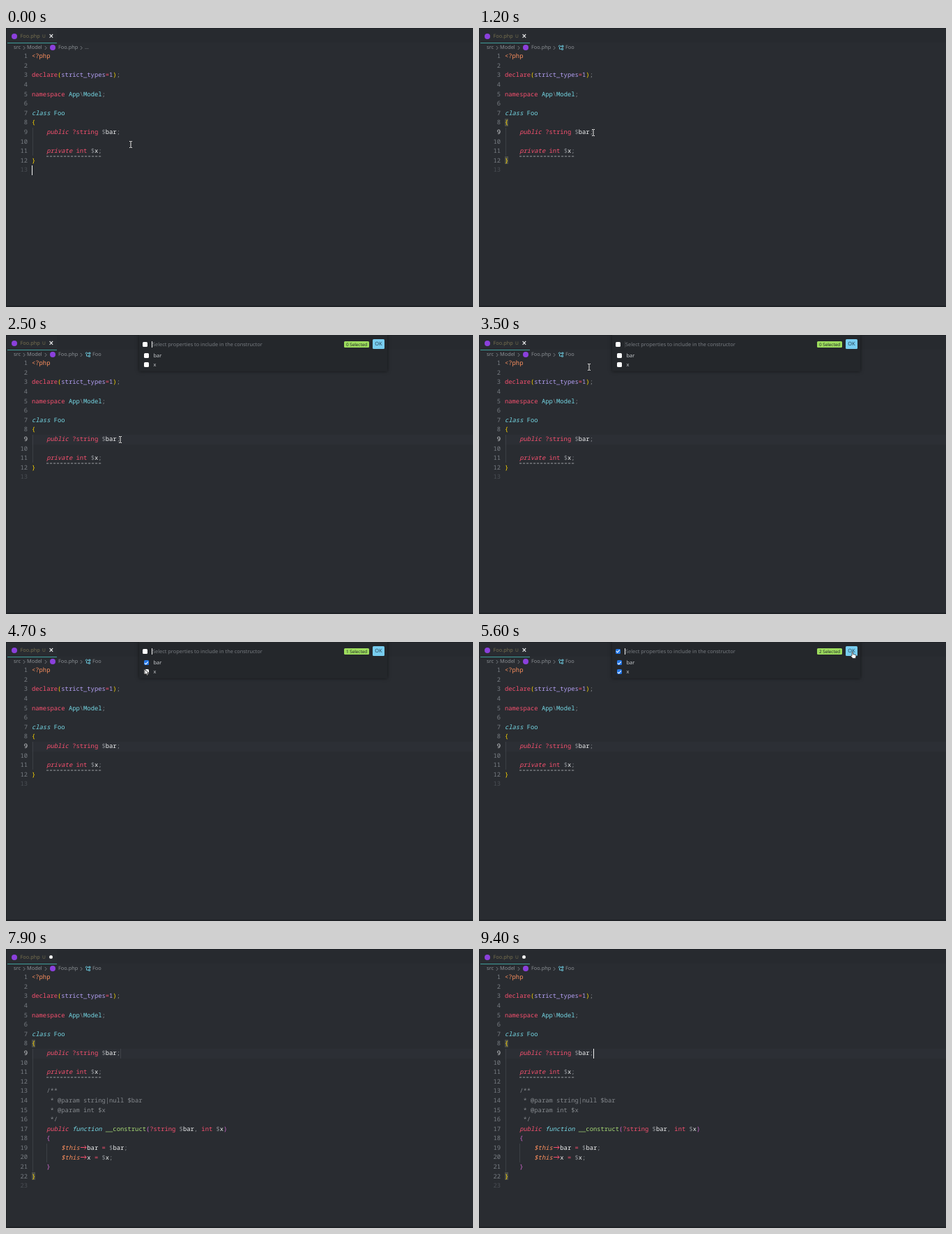
An HTML page for the animation above (9600 ms loop, 670x400 px).

```html
<!DOCTYPE html>
<html lang="en">
<head>
<meta charset="utf-8">
<title>Generate constructor</title>
<style>
html, body { margin: 0; width: 100%; height: 100%; overflow: hidden; background: #292c31; }
#stage {
  position: relative; width: 670px; height: 400px; overflow: hidden; background: #292c31;
  font: 7.36px/14px "Noto Sans", "Open Sans", sans-serif; color: #c8cbcf;
  text-rendering: geometricPrecision; white-space: pre;
}
#stage div, #stage pre, #stage svg.abs { position: absolute; }
pre { margin: 0; font: 500 8.82px/13.6px "Noto Sans Mono", "DejaVu Sans Mono", monospace; color: #f1f2f3; }
.hide { visibility: hidden; }

.edge { background: #1f2226; }
.tabline { left: 2px; top: 21px; width: 71px; height: 1px; background: #3f9d99; }
.dot { border-radius: 50%; }
.file { width: 8px; height: 8px; background: #8b40dc; }
.crumb { color: #8a8e93; }
.tab { color: #756e4e; }

/* syntax colours */
i { font-style: normal; }
.t { font-style: italic; }
.r { color: #f8506f; }
.o { color: #fb8f5e; }
.c { color: #76d9e6; }
.p { color: #b5a1f5; }
.g { color: #a9dc76; }
.d { color: #85898e; }
.y { color: #ffd700; }
.m { color: #d56ad2; }
.raw i:not(.y):not(.m) { color: #e6e7e9; font-style: normal; }
.arrow { width: 10.58px; height: 7px; vertical-align: -0.5px; fill: none; stroke: currentColor; stroke-width: 1; }

#nums { left: 0; top: 34.2px; width: 31px; text-align: right; color: #777c82; }
#nums .dim { color: #4a4e54; }
#nums .now { color: #d4d6d9; }
.guide { width: 1px; background: #3b3f45; }
.match { left: 37px; width: 5px; height: 11px; background: #4a4d48; }
#band { left: 37px; top: 143px; width: 633px; height: 14px; background: #2c2f35; }
#caret { width: 1px; height: 14px; background: #f2f2f2; }

.panel { left: 191px; top: 0; width: 356px; background: #24272b; box-shadow: 0 0 5px #0008; overflow: hidden; }
.field { left: 5px; top: 8px; width: 346px; height: 10px; border: 1px solid #34373c; background: #222529; }
.blink { top: 9px; width: 1px; height: 9px; background: #f2f2f2; }
.key { height: 10px; line-height: 10px; font-size: 6.3px; padding: 0 2.5px; border-radius: 2px; background: #35383d; }
.keys { display: flex; align-items: center; }
#stage .keys > * { position: static; }
.plus { width: 9px; text-align: center; }
.chord { width: 7px; }
.box { width: 7px; height: 7px; border-radius: 1.5px; background: #fff; }
.box.on { background: #2477e6; }
.box.on::after {
  content: ""; position: absolute; left: 2.2px; top: .6px; width: 1.6px; height: 3.6px;
  border: solid #fff; border-width: 0 1px 1px 0; transform: rotate(42deg);
}
.badge { left: 294px; top: 9px; width: 36px; height: 9px; line-height: 9px; font-size: 6.3px; text-align: center; border-radius: 1.5px; background: #9ddc5d; color: #22282a; }
.ok { left: 335px; top: 6px; width: 17px; height: 14px; text-align: center; border-radius: 1.5px; background: #78cdf0; color: #28485a; }
#mouse { left: 0; top: 0; width: 14px; height: 14px; overflow: visible; }
</style>
</head>
<body>
<div id="stage">
  <div class="edge" style="left:0;top:0;width:1px;height:400px"></div>
  <div class="edge" style="left:0;top:0;width:670px;height:1px"></div>
  <div class="edge" style="left:0;top:398px;width:670px;height:2px"></div>
  <div style="left:73px;top:1px;width:597px;height:20px;background:#272a2f"></div>
  <div class="tabline"></div>
  <div class="dot file" style="left:8px;top:8px"></div>
  <div class="tab" style="left:20.5px;top:5px">Foo.php</div>
  <div class="tab" style="left:52px;top:5px;font-size:6.6px">U</div>
  <svg class="abs" id="close" style="left:62px;top:8px" width="6" height="7" stroke="#e8e9ea" stroke-width="1.1"><path d="M.6 1 5.2 5.8M5.2 1 .6 5.8"/></svg>
  <div class="dot" id="dirty" style="left:62px;top:9px;width:5px;height:5px;background:#f0f0f0"></div>

  <div class="crumb" style="left:11px;top:21px">src</div>
  <div class="crumb" style="left:30px;top:21px">Model</div>
  <div class="dot file" style="left:63px;top:24px"></div>
  <div class="crumb" style="left:75px;top:21px">Foo.php</div>
  <svg class="abs" style="left:0;top:21px" width="112" height="14" fill="none" stroke="#8a8e93" stroke-width=".8"><path d="m24.8 5 2.4 2.5-2.4 2.5M55.8 5l2.4 2.5-2.4 2.5M106.8 5l2.4 2.5-2.4 2.5"/></svg>
  <div class="crumb" id="more" style="left:113px;top:21px">…</div>
  <div class="crumb" id="symbol" style="left:124px;top:21px">Foo<svg class="abs" style="left:-11px;top:3px" width="9" height="8" fill="none" stroke="#68bfd2" stroke-width="1"><path d="M1 2.2 2.5.8 4 2.2 2.5 3.7zM2.5 3.7v2.5h3M4 2.2h2M6 1.2h2v2H6zM5.6 5.2h2v2h-2z"/></svg></div>

  <div id="band"></div>
  <div class="guide" id="outer" style="left:38px;top:143px"></div>
  <div class="guide" id="inner" style="left:58px;top:279px;height:27px"></div>
  <div class="match" style="top:130px"></div>
  <div class="match" id="endMatch"></div>
  <pre id="nums"></pre>
  <pre style="left:37px;top:34.2px"><i class="o">&lt;?php</i>

<i class="r">declare</i><i class="y">(</i><i class="p">strict_types</i><i class="r">=</i><i class="p">1</i><i class="y">)</i><i class="d">;</i>

<i class="r">namespace</i> <i class="c">App</i><i class="d">\</i><i class="c">Model</i><i class="d">;</i>

<i class="c t">class</i> <i class="c">Foo</i>
<i class="y">{</i>
    <i class="r t">public</i> <i class="r">?string</i> <i class="d">$</i>bar<i class="d">;</i>

    <i class="r t">private</i> <i class="r">int</i> <i class="d">$</i>x<i class="d">;</i></pre>
  <svg class="abs" style="left:58px;top:183px" width="80" height="2" stroke="#9a9da1" stroke-dasharray="3.2 1.8"><path d="M0 1h79"/></svg>
  <pre id="shortEnd" style="left:37px;top:183.8px"><i class="y">}</i></pre>
  <pre id="added" style="left:37px;top:197.4px">    <i class="d">/**</i>
    <i class="d"> * @param string|null $bar</i>
    <i class="d"> * @param int $x</i>
    <i class="d"> */</i>
    <i class="r t">public</i> <i class="c t">function</i> <i class="g">__construct</i><i class="m">(</i><i class="r">?string</i> <i class="d">$</i>bar<i class="d">,</i> <i class="r">int</i> <i class="d">$</i>x<i class="m">)</i>
    <i class="m">{</i>
        <i class="o t">$this</i><i class="r to"></i>bar <i class="r">=</i> <i class="d">$</i>bar<i class="d">;</i>
        <i class="o t">$this</i><i class="r to"></i>x <i class="r">=</i> <i class="d">$</i>x<i class="d">;</i>
    <i class="m">}</i>
<i class="y">}</i></pre>
  <div id="caret"></div>

  <div class="panel" id="palette" style="height:290px">
    <div class="field"></div>
    <div style="left:8px;top:6.5px">&gt;</div>
    <div class="blink" style="left:13px"></div>
    <div style="left:4px;top:23px;width:350px;height:13px;background:#383b40"></div>
    <div style="left:4px;top:140px;width:350px;height:1px;background:#33363b"></div>
    <div style="right:26px;top:22.5px">recently used</div>
    <svg class="abs" style="left:334px;top:25px" width="9" height="9" fill="none" stroke="#c8cbcf"><circle cx="4.5" cy="4.5" r="2.6"/><circle cx="4.5" cy="4.5" r="3.5" stroke-dasharray="1.3 1.45"/><circle cx="4.5" cy="4.5" r=".5"/></svg>
    <div style="right:12px;top:140px;color:#3b94ec">other commands</div>
    <div id="thumb" style="left:350px;top:23px;width:5px;height:13px;background:#53575c"></div>
  </div>

  <div class="panel" id="picker" style="height:52px">
    <div class="box" id="all" style="left:4.5px;top:9.5px"></div>
    <div style="left:19px;top:6.5px;color:#777b80">Select properties to include in the constructor</div>
    <div class="blink" style="left:18px"></div>
    <div class="badge"><span id="count">0</span> Selected</div>
    <div class="ok">OK</div>
    <div class="box" id="bar" style="left:7px;top:26px"></div>
    <div style="left:20.5px;top:22.5px">bar</div>
    <div class="box" id="x" style="left:7px;top:39px"></div>
    <div style="left:20.5px;top:35.5px">x</div>
  </div>

  <svg class="abs" id="mouse" stroke-linejoin="round">
    <g id="beam" fill="none"><path d="M-2-4.5h1.3L0-3.8.7-4.5H2M0-3.8V3.8M-2 4.5h1.3L0 3.8.7 4.5H2" stroke="#15171a" stroke-width="2"/><path d="M-2-4.5h1.3L0-3.8.7-4.5H2M0-3.8V3.8M-2 4.5h1.3L0 3.8.7 4.5H2" stroke="#fff" stroke-width="1"/></g>
    <path id="arrow" d="M0 0V8.2L2 6.4 3.4 9.3 4.8 8.6 3.4 5.8H6z" fill="#fff" stroke="#111" stroke-width=".9"/>
    <path id="hand" d="M0 .6Q.8-.4 1.6.6V3.6L5 4.2Q6.2 4.5 6 6L5.4 9.4H1.2L-1.6 6.4Q-1.4 5.2 0 5.8z" fill="#fff" stroke="#15171a" stroke-width=".7"/>
  </svg>
</div>

<script>
const $ = id => document.getElementById(id);
const all = sel => [...document.querySelectorAll(sel)];
const show = (el, on) => el.classList.toggle("hide", !on);
const LOOP = 9600, ROW = 13.6;

$("nums").innerHTML = Array.from({ length: 23 }, (_, i) => `<i>${i + 1}</i>`).join("\n");
const nums = [...$("nums").children];
all(".to").forEach(el => el.innerHTML =
  '<svg class="arrow" viewBox="0 0 10.58 7"><path d="M1 3.5H9.2M6.6 1 9.2 3.5 6.6 6"/></svg>');

// Palette rows: label | shortcut | right edge of the shortcut
const tool = "Mellowed Dev Crate. ";
const commands = [
  ...["Generate class constructor", "Generate class", "Generate trait", "Insert getter and setter",
    "Insert getter", "Insert setter", "Generate abstract class", "Generate enum"].map(s => tool + s),
  "Accounts: Manage Trusted Extensions For Account",
  "Add Cursor Above|Shift+Alt+UpArrow|76", "Add Cursor Below|Shift+Alt+DownArrow",
  "Add Cursors To Bottom", "Add Cursors to Line Ends|Shift+Alt+I", "Add Cursors To Top",
  "Add Data Breakpoint at Address", "Add Function Breakpoint", "Add Line Comment|Ctrl+K Ctrl+C",
  "Add Selection To Next Find Match", "Add Selection To Previous Find Match",
  "Add to Favorites", "Add XHR/fetch Breakpoint"
];
const chips = s => s.split(" ").map(part => part.split("+")
  .map(k => `<div class="key">${k}</div>`).join('<div class="plus">+</div>'))
  .join('<div class="chord"></div>');
commands.forEach((row, i) => {
  const [label, keys, right = 15] = row.split("|"), top = 22.5 + 13 * i;
  $("palette").insertAdjacentHTML("beforeend", `<div style="left:10px;top:${top}px">${label}</div>` +
    (keys ? `<div class="keys" style="right:${right}px;top:${top}px">${chips(keys)}</div>` : ""));
});

// Pointer path: time, x, y
const path = [
  [0, 179, 167], [100, 175, 163], [200, 168, 155], [300, 164, 150], [3400, 164, 150],
  [3500, 158, 46], [3600, 172, 37], [3800, 198, 28], [4400, 199, 29], [4700, 199, 39],
  [5000, 200, 39], [5200, 262, 35], [5400, 505, 20], [5600, 535, 14], [6700, 535, 14],
  [6900, 645, 14]
];
function pointer(t) {
  const i = path.findIndex(p => p[0] > t);
  if (i < 0) return path[path.length - 1].slice(1);
  const [a, b] = [path[i - 1], path[i]], k = (t - a[0]) / (b[0] - a[0]);
  return [a[1] + (b[1] - a[1]) * k, a[2] + (b[2] - a[2]) * k];
}

// Half a second on, half a second off, with a soft first step
function blink(t, since) {
  const age = t - since, phase = age % 1000;
  if (age < 500) return 1;
  if (phase >= 500) return phase < 600 ? .5 : .1;
  return phase < 100 ? .1 : 1;
}

function render(time) {
  const t = Math.floor(time / 100) * 100;
  const clicked = t >= 400, named = t >= 500, inserted = t >= 6000;
  const palette = t >= 1400 && t < 2500, picker = t >= 2500 && t < 5900;
  const last = inserted ? 23 : 13;

  show($("close"), !inserted);
  show($("dirty"), inserted);
  show($("more"), !named);
  show($("symbol"), named);
  show($("band"), t >= 1400);
  show($("shortEnd"), !inserted);
  show($("added"), inserted);
  show($("inner"), inserted);
  $("added").classList.toggle("raw", t < 6200);
  $("outer").style.height = (inserted ? 176 : 40) + "px";
  nums.forEach((n, i) => {
    show(n, i < last);
    n.classList.toggle("dim", i + 1 === last);
    n.classList.toggle("now", i === 8 && clicked);
  });
  const matched = (named && t < 1400) || t >= 6200;
  all(".match").forEach(el => show(el, matched));
  $("endMatch").style.top = 130 + (last - 9) * ROW + "px";

  const caret = $("caret").style;
  caret.left = (clicked ? 164 : 37) + "px";
  caret.top = (clicked ? 143 : 197) + "px";
  caret.opacity = palette || picker ? 0 : blink(t, t < 5900 ? 600 : 6300);

  show($("palette"), palette);
  show($("picker"), picker);
  $("palette").querySelector(".blink").style.opacity = blink(t, 1500);
  $("picker").querySelector(".blink").style.opacity = blink(t, 2500);
  $("thumb").style.opacity = t < 2000 ? 1 : t < 2300 ? .7 : .5;
  const bar = t >= 4300, x = t >= 4900;
  $("bar").classList.toggle("on", bar);
  $("x").classList.toggle("on", x);
  $("all").classList.toggle("on", bar && x);
  $("count").textContent = bar + x;

  const [mx, my] = pointer(t);
  const hand = mx > 524, arrow = !hand && picker && mx > 191 && my < 52;
  $("mouse").style.transform = `translate(${mx}px, ${my}px)`;
  $("mouse").style.opacity = t < 7000 ? 1 : 0;
  show($("hand"), hand);
  show($("arrow"), arrow);
  show($("beam"), !hand && !arrow);
}

const start = performance.now();
function tick() {
  render((performance.now() - start) % LOOP);
  requestAnimationFrame(tick);
}
tick();
</script>
</body>
</html>
```
